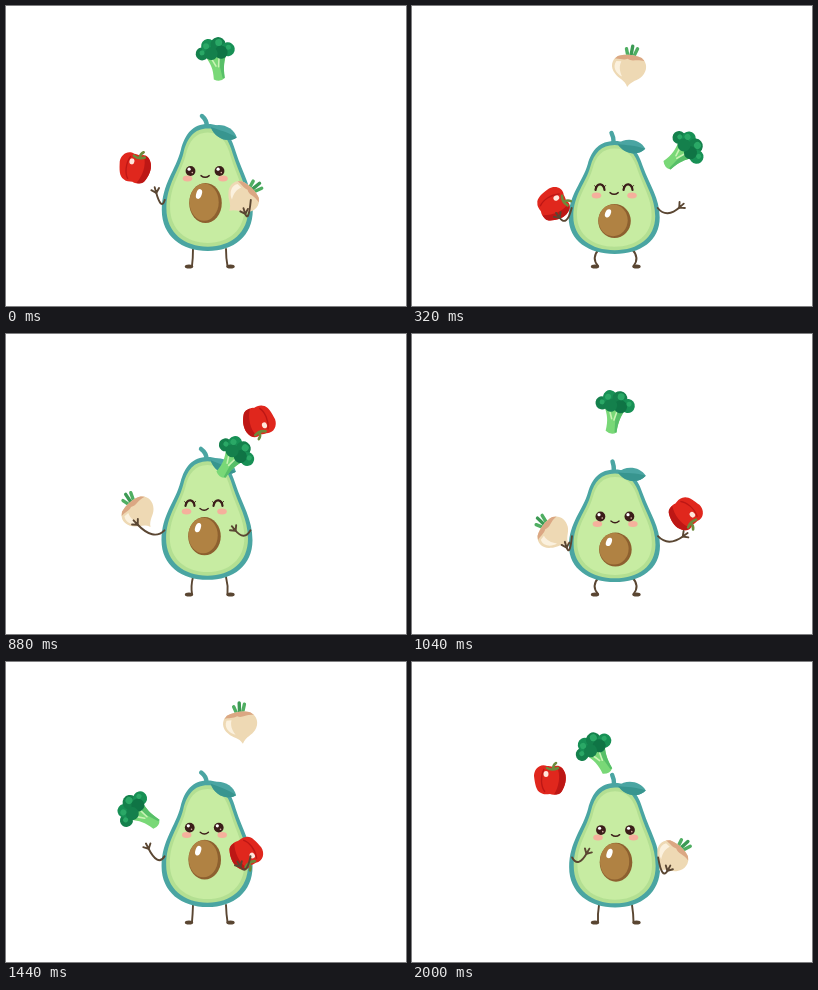
These frames come from a looping animation (400x300 px, 2.08 s). An HTML page:

```html
<!DOCTYPE html>
<html lang="en">
<head>
<meta charset="utf-8">
<title>Juggling avocado</title>
<style>
  html, body { margin: 0; width: 100%; height: 100%; overflow: hidden; background: #fff; }
  svg { display: block; width: 100vw; height: 100vh; }
  .limb { fill: none; stroke: #5a4632; stroke-width: 1.9; stroke-linecap: round; stroke-linejoin: round; }
  .teal { fill: #4aa5a2; }
</style>
</head>
<body>
<svg viewBox="0 0 400 300">
  <defs>
    <path id="shape" d="M203 118C188 118 180 128 176 144C171 164 157 178 157 204C157 230 177 245 203 245C229 245 248 230 248 204C248 182 238 168 231 146C226 128 218 118 203 118Z"/>
    <g id="hand" class="limb" stroke-width="1.7">
      <path d="M-1 0L5 0M-1 0L3 -4M-1 0L3 4"/>
    </g>
    <g id="openEye">
      <circle r="4.9" fill="#3b1d19"/>
      <circle cx="-1.4" cy="-1.8" r="1.6" fill="#fff"/>
      <circle cx="1.8" cy="1.6" r=".8" fill="#d9b6a8"/>
    </g>
    <g id="happyEye" fill="none" stroke="#3b1d19" stroke-linecap="round">
      <path d="M-4.5 2Q-3.5 -4 .5 -3.6Q4 -3 4.5 2" stroke-width="2.2"/>
      <path d="M-4 -1L-5.4 -2.2M4.2 -1L5.5 -2.4" stroke-width="1"/>
    </g>
  </defs>

  <g class="limb">
    <path id="legL"/>
    <path id="legR"/>
  </g>
  <g fill="#5a4632">
    <ellipse cx="183" cy="260.6" rx="4.2" ry="2"/>
    <ellipse cx="224.5" cy="260.6" rx="4.2" ry="2"/>
  </g>

  <path id="stem" fill="none" stroke="#4aa5a2" stroke-width="4.4" stroke-linecap="round"/>
  <g id="body">
    <use href="#shape" class="teal"/>
    <use href="#shape" fill="#b3df92" transform="translate(203 183) scale(.9 .93) translate(-203 -183)"/>
    <use href="#shape" fill="#c7eca2" transform="translate(203 183) scale(.82 .87) translate(-203 -183)"/>
  </g>
  <g id="leaf">
    <path class="teal" d="M0 0C6 -8 21 -9 28 0C22 9 8 9 0 0Z"/>
    <path d="M0 0C8 0 18 -2 28 0C22 9 8 9 0 0Z" fill="#38958f"/>
  </g>

  <g id="pit">
    <ellipse rx="16.3" ry="20" fill="#8d602f"/>
    <ellipse cx="-1.4" cy="-.8" rx="14.6" ry="18.6" fill="#b08243"/>
    <ellipse cx="-6.5" cy="-9" rx="2.8" ry="5" fill="#fff" transform="rotate(18 -6.5 -9)"/>
  </g>
  <g id="face">
    <g fill="#f5b09c">
      <ellipse cx="-17.5" cy="7.5" rx="4.8" ry="3"/>
      <ellipse cx="18" cy="7.5" rx="4.8" ry="3"/>
    </g>
    <g id="open">
      <use href="#openEye" x="-14.5"/>
      <use href="#openEye" x="14.5"/>
    </g>
    <g id="happy">
      <use href="#happyEye" x="-14"/>
      <use href="#happyEye" x="14"/>
    </g>
    <path d="M-4 4.6Q.2 8 4.2 4.6" fill="none" stroke="#3b1d19" stroke-width="1.4" stroke-linecap="round"/>
  </g>

  <g id="turnip">
    <g fill="none" stroke="#4fae62" stroke-width="3.4" stroke-linecap="round">
      <path d="M-2 -10L-4 -17M4 -10L7 -18"/>
      <path d="M1 -10L2 -20" stroke="#3c9a54"/>
    </g>
    <path d="M-12 -9C-5 -12 6 -12 12 -9C18 -5 19 3 14 9C10 14 4 14 0 21C-3 14 -9 14 -13 9C-19 3 -18 -5 -12 -9Z" fill="#eed9b4"/>
    <path d="M-12 -9C-5 -12 6 -12 12 -9L15 -6C7 -8 3 -4 -2 -7C-6 -5 -11 -7 -15 -6Z" fill="#dba783"/>
    <path d="M-13 -4C-17 2 -12 9 -6 11C-9 6 -10 1 -8 -4Z" fill="#fbf1de"/>
  </g>

  <g id="pepper">
    <path d="M-3 -13C-10 -16 -16 -10 -16 -3C-15 5 -14 12 -9 14C-6 16 -3 15 0 15C4 17 10 15 12 12C15 7 17 0 15 -6C13 -13 7 -15 3 -12C1 -13 -1 -13 -3 -13Z" fill="#e0271d"/>
    <path d="M7 -12C11 -4 9 8 4 15.500C9 16 11 14 12 12C15 7 17 0 15 -6C13 -11 10 -13 7 -12Z" fill="#bd1715"/>
    <path d="M-6 -10C-10 -2 -9 8 -5 13" fill="none" stroke="#bd1715" stroke-width="1.3"/>
    <path d="M-3 -11Q2 -8 8 -11M3 -10Q3 -14 6 -16" fill="none" stroke="#6d8a3c" stroke-width="2.6" stroke-linecap="round"/>
    <ellipse cx="-4" cy="-5" rx="2.5" ry="3" fill="#ffe6dc"/>
  </g>

  <g id="broccoli">
    <path d="M-10 -4L11 -4C8 3 6 8 6 20Q1 24 -5 20C-4 9 -6 4 -10 -4Z" fill="#79d877"/>
    <path d="M2 1L4 20L6 20C6 8 8 3 11 -4Z" fill="#57bf68"/>
    <path d="M-4 0L-1 7M3 0L1.500 8" stroke="#c9f3b4" stroke-width="1.6" stroke-linecap="round"/>
    <g id="crown"></g>
  </g>

  <path id="armL" class="limb"/>
  <path id="armR" class="limb"/>
  <use id="handL" href="#hand"/>
  <use id="handR" href="#hand"/>
</svg>

<script>
const STEP = 80, FRAMES = 26, BEAT = FRAMES * STEP / 3;
const $ = id => document.getElementById(id);
const set = (id, name, value) => $(id).setAttribute(name, value);
const move = (id, x, y, rest = '') => set(id, 'transform', `translate(${x} ${y}) ${rest}`);

// Smooth closed curve through rows of [time, ...values].
function curve(rows, period) {
  const n = rows.length;
  const row = i => {
    const lap = Math.floor(i / n), [t, ...v] = rows[i - lap * n];
    return { t: t + lap * period, v };
  };
  return time => {
    const t = time % period;
    let i = n - 1;
    while (rows[i][0] > t) i--;
    const [a, b, c, d] = [-1, 0, 1, 2].map(k => row(i + k));
    const h = c.t - b.t, u = (t - b.t) / h;
    return b.v.map((p, k) => {
      const q = c.v[k];
      const m0 = (q - a.v[k]) / (c.t - a.t) * h;
      const m1 = (d.v[k] - p) / (d.t - b.t) * h;
      return p + u * (m0 + u * (3 * (q - p) - 2 * m0 - m1 + u * (2 * (p - q) + m0 + m1)));
    });
  };
}

// Rows: step, x, y, angle
const flights = {
  pepper: [
    [0, 129, 161, 10], [2, 126, 194, 35], [4, 142, 198, 60], [5, 158, 190, 40],
    [7, 199, 136, -30], [9, 233, 61, -120], [11, 253, 88, -200], [13, 274, 180, -225],
    [15, 269, 191, -230], [17, 250, 194, -220], [19, 230, 180, -205],
    [21, 208, 109, -180], [23, 172, 63, -70], [25, 138, 117, 0]
  ],
  turnip: [
    [0, 238, 190, 45], [2, 228, 118, 25], [4, 217, 60, 5], [5, 202, 48, -2],
    [7, 167, 75, -12], [9, 142, 130, -25], [11, 131, 177, -40], [13, 140, 198, -52],
    [15, 197, 150, -40], [16, 210, 105, -30], [18, 234, 61, -8], [20, 258, 106, 12],
    [21, 267, 158, 18], [23, 272, 193, 35], [25, 261, 193, 42]
  ],
  broccoli: [
    [0, 210, 53, -8], [1, 224, 39, 5], [3, 257, 86, 35], [4, 270, 146, 50],
    [5, 275, 183, 60], [7, 269, 195, 60], [9, 246, 182, 50], [11, 226, 124, 35],
    [14, 189, 60, -5], [15, 175, 64, -20], [17, 145, 118, -45], [19, 126, 180, -65],
    [21, 128, 193, -70], [22, 140, 192, -65], [24, 168, 137, -45], [25, 185, 92, -30]
  ]
};
const items = Object.entries(flights).map(([id, rows]) => [id, curve(rows, FRAMES)]);

// Rows: ms, squash, sway, leaf angle, left hand x y, right hand x y
const pose = curve([
  [0, 0, -4, 22, 150, 186, 239, 207],
  [187, .29, -5, 25, 131, 190, 229, 196],
  [293, .88, -3.5, 18, 138, 205, 249, 200],
  [320, 1, -1, 10, 147, 211, 268, 201],
  [400, 1, 1, 2, 167, 213, 272, 204],
  [507, .53, 2.500, -8, 181, 204, 268, 209],
  [560, .29, 2, 3, 180, 197, 264, 206],
  [613, .18, .5, 9, 175, 191, 256, 208]
], BEAT);

function drawArm(side, sx, sy, hx, hy) {
  const cx = sx * .6 + hx * .4, cy = Math.max(sy, hy) + 11;
  const angle = Math.atan2(hy - cy, hx - cx) * 180 / Math.PI;
  set('arm' + side, 'd', `M${sx} ${sy}Q${cx} ${cy} ${hx} ${hy}`);
  move('hand' + side, hx, hy, `rotate(${angle})`);
}

function draw(step) {
  const [squash, sway, tilt, lx, ly, rx, ry] = pose(step * STEP);
  const shift = sway * .3, drop = 17 * squash;
  const top = 118 + drop, base = 245 + 3 * squash, mid = 203 + shift;

  move('body', shift, base, `scale(1 ${(base - top) / 127}) translate(0 -245)`);
  set('stem', 'd', `M${mid - 1} ${top + 2}Q${mid - 1} ${top - 4} ${mid - 1 - tilt * .22} ${top - 8}`);
  move('leaf', mid + 3, top + 3, `rotate(${tilt})`);
  move('pit', 203.500 + sway, 197 + 18 * squash, `scale(1 ${1 - .15 * squash})`);
  move('face', 203 + sway, 165 + drop);

  const happy = step >= 3 && step <= 12;
  set('open', 'visibility', happy ? 'hidden' : 'visible');
  set('happy', 'visibility', happy ? 'visible' : 'hidden');

  const bow = 4 * squash;
  set('legL', 'd', `M187 243Q${187 - bow * 2} 252 186 260`);
  set('legR', 'd', `M220 243Q${220 + bow * 2} 252 221.500 260`);

  for (const [id, at] of items) {
    const [x, y, angle] = at(step);
    move(id, x, y, `rotate(${angle})`);
  }
  const shoulder = 194 + 8 * squash;
  drawArm('L', 160 + shift, shoulder, lx, ly);
  drawArm('R', 246 + shift, shoulder, rx, ry);
}

// Rows: x, y, radius, colour
$('crown').innerHTML = [
  [-13, -7, 6.5, '#14804c'], [-6, -14, 7, '#179055'], [4, -14, 7.5, '#14804c'],
  [13, -8, 7, '#179055'], [6, -6, 6.5, '#0f7445'], [-4, -6, 6.5, '#14804c'],
  [-8, -14, 3, '#2aa866'], [5, -16, 3.5, '#2aa866'], [14, -10, 2.5, '#2aa866'], [-13, -8, 2.5, '#2aa866']
].map(([x, y, r, c]) => `<circle cx="${x}" cy="${y}" r="${r}" fill="${c}"/>`).join('');

function tick() {
  draw(Math.floor(performance.now() / STEP) % FRAMES);
  requestAnimationFrame(tick);
}
tick();
</script>
</body>
</html>
```
